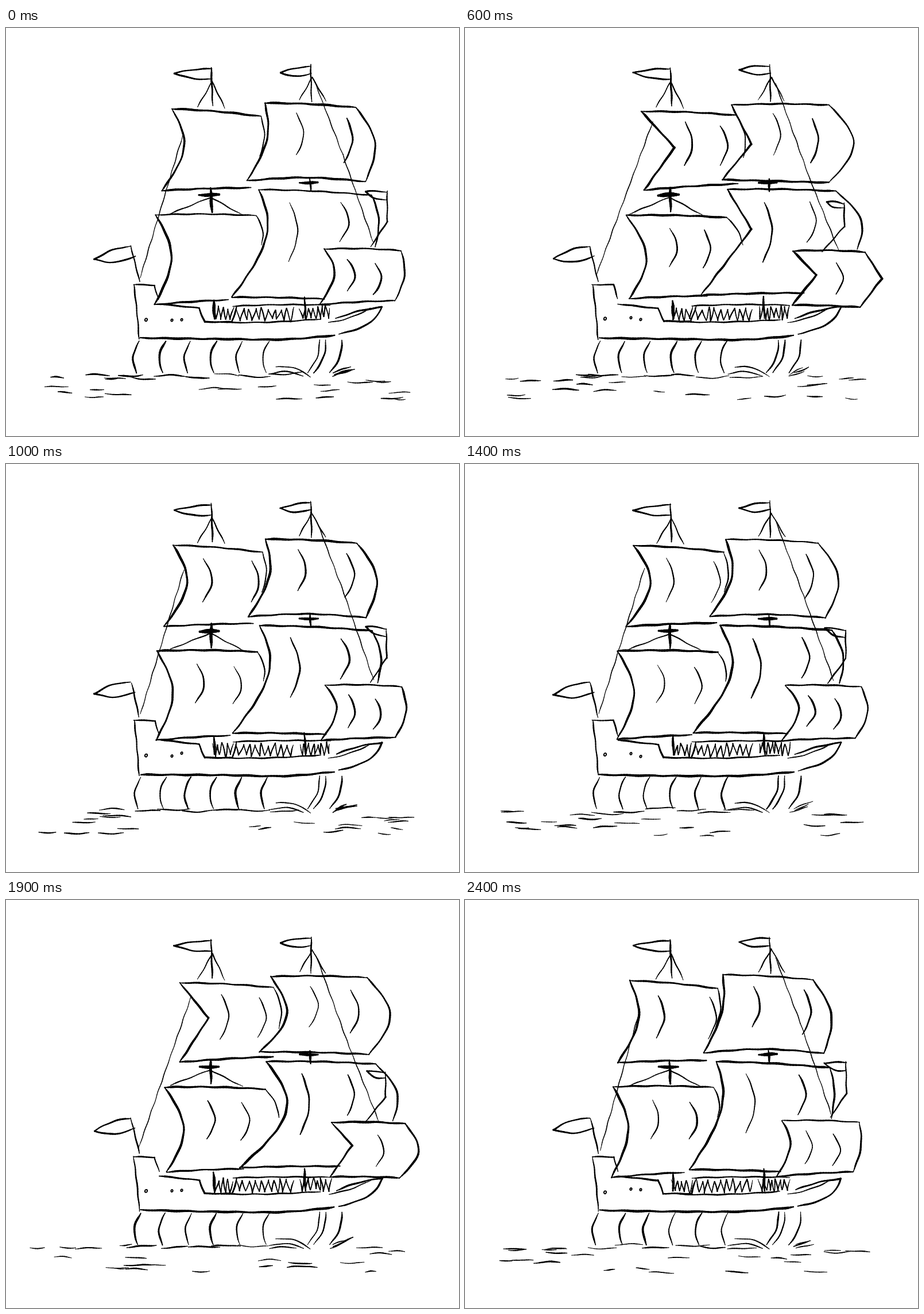
These frames come from a looping animation (789x710 px, 2.5 s). An HTML page with a canvas:

```html
<!DOCTYPE html>
<html lang="en">
<head>
<meta charset="utf-8">
<title>Sailing ship</title>
<style>
html, body { margin: 0; width: 100%; height: 100%; overflow: hidden; background: #fff; }
canvas { display: block; }
</style>
</head>
<body>
<canvas id="stage" width="789" height="710"></canvas>
<script>
const ctx = document.getElementById("stage").getContext("2d");
const STEP = 100, STEPS = 25;

// How full the sails are: [step, wind]
const gusts = [[0, 0.12], [2, 0.55], [6, 1], [10, 0.2], [14, 0.32], [19, 0.8], [24, 0]];

// Corners and edge bows, slack / full:
// luff (top, bow, bottom), leech (top, bow, end), far foot corner
const sails = {
  topLeft: "287 140 303 195 266 283 440 154 445 190 436 222 420 279 / 307 145 365 208 312 282 473 152 488 190 485 225 476 271",
  topRight: "449 130 451 172 416 266 606 139 638 200 625 267 625 267 / 464 134 499 202 448 264 634 134 677 200 634 269 634 269",
  lowLeft: "258 325 284 390 255 483 433 326 443 352 440 378 382 474 / 281 326 316 402 286 471 456 330 476 354 484 378 422 466",
  main: "438 281 449 323 391 469 636 292 643 328 638 380 550 473 / 457 281 499 350 411 465 646 284 692 345 683 385 590 461",
  jib: "552 384 566 415 543 481 687 387 690 425 676 473 676 473 / 571 388 612 430 570 482 697 390 726 436 688 486 688 486"
};

// Creases in the cloth: slack x, full x, y, half height
const folds = {
  topLeft: [[348, 396, 203, 38], [438, 457, 205, 35]],
  topRight: [[515, 550, 185, 36], [603, 616, 195, 38]],
  lowLeft: [[338, 370, 382, 33], [405, 428, 385, 32]],
  main: [[505, 535, 355, 52], [594, 611, 338, 35]],
  jib: [[606, 615, 430, 28], [653, 659, 436, 27]]
};

// Straight rigging: width, points, optionally a second state for full wind
const rigging = [
  [3, "357 69 360 136"], [2, "333 138 359 94 381 139"],
  [2.5, "531 64 532 128"], [2, "511 125 533 86 557 127"],
  [2.5, "218 380 232 441"],
  [1.5, "305 190 235 436 / 327 162 229 430"],
  [1.5, "541 100 585 215 638 372 / 540 95 600 262 651 388"],
  [2.5, "664 282 664 336 637 378 / 660 304 661 345 622 390"],
  [7, "337 291 371 290"], [5, "357 278 358 320"], [2, "286 323 356 295 412 325"],
  [6, "512 269 543 269"], [4, "529 262 531 284"],
  [2.5, "222 446 259 447 266 472"],
  [3, "266 480 336 488 346 511 394 511 402 484"],
  [5, "362 474 363 506"], [4, "520 468 522 506"]
];

const flags = [
  "358 71 327 72 293 78 324 87 359 89",
  "531 67 505 68 478 75 500 82 532 79",
  "217 380 190 383 154 400 186 406 225 397",
  "664 283 642 281 626 282 642 294 663 297 / 660 306 645 302 630 302 640 311 659 313"
];

const hull = [
  [2.5, "223 446 228 492 232 542"],
  [2.5, "375 512 450 512 548 507"], [2.5, "395 484 480 482 565 482"],
  [3, "575 505 612 493 655 485 648 499 580 533"], [2, "562 512 595 505 635 488"],
  [4, "234 540 380 542 495 542 572 535"]
];

let seed = 1;
function rand() {
  seed = (seed + 0x6D2B79F5) | 0;
  let t = Math.imul(seed ^ (seed >>> 15), 1 | seed);
  t ^= t + Math.imul(t ^ (t >>> 7), 61 | t);
  return ((t ^ (t >>> 14)) >>> 0) / 4294967296;
}
const spread = r => (rand() * 2 - 1) * r;
const range = (a, b) => a + (b - a) * rand();
const lerp = (a, b, t) => a + (b - a) * t;
const dist = (a, b) => Math.hypot(b[0] - a[0], b[1] - a[1]) || 1;
const both = f => [f(0), f(1)];

function points(text, wind) {
  const [a, b = a] = text.split("/").map(s => s.trim().split(" ").map(Number));
  const out = [];
  for (let i = 0; i < a.length; i += 2) out.push(both(k => lerp(a[i + k], b[i + k], wind)));
  return out;
}

function isCorner(a, b, c) {
  const dot = (b[0] - a[0]) * (c[0] - b[0]) + (b[1] - a[1]) * (c[1] - b[1]);
  return dot < 0.4 * dist(a, b) * dist(b, c);
}

function splitRuns(pts, straight) {
  const runs = [];
  let run = [pts[0]];
  for (let i = 1; i < pts.length; i++) {
    run.push(pts[i]);
    if (i === pts.length - 1 || straight || isCorner(pts[i - 1], pts[i], pts[i + 1])) {
      runs.push(run);
      run = [pts[i]];
    }
  }
  return runs;
}

// Unit-speed directions for a smooth curve through the points
function slopes(p) {
  const n = p.length - 1;
  const dir = i => both(k => (p[i + 1][k] - p[i][k]) / dist(p[i], p[i + 1]));
  if (n === 1) return [dir(0), dir(0)];
  const m = p.map((_, i) => {
    if (!i || i === n) return null;
    const l = dist(p[i - 1], p[i]), r = dist(p[i], p[i + 1]), d = dir(i - 1), e = dir(i);
    return both(k => (d[k] * r + e[k] * l) / (l + r));
  });
  m[0] = both(k => 1.5 * dir(0)[k] - m[1][k] / 2);
  m[n] = both(k => 1.5 * dir(n - 1)[k] - m[n - 1][k] / 2);
  return m;
}

function sample(p) {
  const m = slopes(p), out = [p[0]];
  for (let i = 0; i < p.length - 1; i++) {
    const len = dist(p[i], p[i + 1]), n = Math.max(3, Math.ceil(len / 5));
    for (let j = 1; j <= n; j++) {
      const t = j / n, u = 1 - t;
      out.push(both(k => u * u * (1 + 2 * t) * p[i][k] + t * t * (3 - 2 * t) * p[i + 1][k]
        + t * u * len * (u * m[i][k] - t * m[i + 1][k])));
    }
  }
  return out;
}

// Brush line with a slight tremble and uneven pressure
function stroke(pts, width, straight) {
  const path = splitRuns(pts, straight).flatMap(sample);
  const phase = rand() * 7, n = path.length - 1;
  const at = i => [path[i][0] + 0.45 * Math.sin(i * 0.9 + phase), path[i][1] + 0.45 * Math.cos(i * 0.7 + phase)];
  for (let i = 0; i < n; i++) {
    const taper = Math.min(1, 0.6 + Math.min(i, n - 1 - i) * 0.2);
    ctx.lineWidth = Math.max(1, width * taper * (0.95 + 0.15 * Math.sin(i * 0.35 + phase)));
    ctx.beginPath();
    ctx.moveTo(...at(i));
    ctx.lineTo(...at(i + 1));
    ctx.stroke();
  }
}

const loosen = (pts, r) => pts.map(([x, y]) => [x + spread(r), y + spread(r)]);

function edge(a, b, sag, width) {
  stroke([a, [(a[0] + b[0]) / 2, (a[1] + b[1]) / 2 + sag], b], width);
}

function drawSail(name, wind, creased) {
  const [luffTop, luffBow, luffEnd, leechTop, leechBow, leechEnd, foot] = points(sails[name], wind);
  const left = name.endsWith("Left");
  edge(luffTop, leechTop, -2, range(2.5, 4));
  edge(luffEnd, foot, name === "topRight" ? -7 + 7 * wind : -1, range(3, 4));
  stroke([luffTop, luffBow, luffEnd], range(3.2, 4.2));
  stroke([leechTop, leechBow, leechEnd], left ? 2.2 : range(2.5, 3.7));
  folds[name].forEach(([slack, full, y, h], i) => {
    if (!creased && left || name === "jib" && !i && wind > 0.7) return;
    const x = lerp(slack, full, wind), bow = 8 + h * 0.12;
    stroke(loosen([[x - bow, y - h], [x, y], [x - bow - 2, y + h]], 1.5), range(1.8, 3.2));
  });
}

function drawRibs() {
  for (let i = 0; i < 6; i++) {
    const x = 234 + 44.5 * i + spread(2);
    stroke([[x, 545], [x - 11, 573], [x - 5, 600]], range(2, 3.8));
  }
  for (const x of [546, 557, 585])
    stroke([[x, 543], [x - 3, 570], [x - 21, 600]], range(2, 3.2));
}

function zigzag(x0, x1, y0, y1, teeth) {
  const pts = [];
  for (let i = 0; i <= teeth * 2; i++)
    pts.push([lerp(x0, x1, i / teeth / 2) + spread(2), (i % 2 ? y1 : y0) + spread(3)]);
  stroke(pts, 2, true);
}

function dash(x, y, dx, dy, width) {
  stroke([[x, y], [x + dx / 2, y + dy / 2 + spread(dx * 0.05)], [x + dx, y + dy]], width);
}

function drawSea() {
  for (let i = 0; i < 10; i++) {
    dash(range(40, 210), range(601, 645), range(18, 48), spread(2), range(1.5, 3));
    dash(range(220, 690), range(616, 648), range(18, 45), spread(3), range(1.5, 2.5));
  }
  for (let x = 218; x < 480; x += 48)
    dash(x + spread(8), 604 + spread(4), range(40, 60), spread(4), range(1.5, 2.8));
  for (let i = 0; i < 3; i++) {
    dash(572 + spread(8), 606 - i * 3, range(22, 38), -range(6, 18), range(1.5, 3));
    dash(range(595, 680), range(605, 616), range(22, 45), spread(2), 2);
  }
  stroke([[470, 590], [500, 591], [530, 607]], 2);
  stroke([[458, 602], [490, 598], [518, 606]], 2);
}

function drawHoles() {
  ctx.lineWidth = 2;
  for (const [x, r] of [[244, 2.5], [289, 2], [306, 2]]) {
    ctx.beginPath();
    ctx.ellipse(x, 506 + spread(3), r * 0.8, r, 0.3, 0, Math.PI * 2);
    ctx.stroke();
  }
}

function windAt(step) {
  const i = Math.min(gusts.findLastIndex(g => g[0] <= step), gusts.length - 2);
  const [[s0, w0], [s1, w1]] = [gusts[i], gusts[i + 1]];
  return lerp(w0, w1, (step - s0) / (s1 - s0));
}

function draw(step) {
  const wind = windAt(step);
  seed = step * 7919 + 17;
  ctx.fillStyle = "#fff";
  ctx.fillRect(0, 0, 789, 710);
  ctx.strokeStyle = "#000";
  ctx.lineCap = ctx.lineJoin = "round";
  for (const [w, text] of rigging) stroke(loosen(points(text, wind), 0.8), w, true);
  for (const text of flags) {
    const flap = spread(3);
    stroke(points(text, wind).map(([x, y], i) => [x, y + flap * Math.sin(i * Math.PI / 4)]), 2.8);
  }
  for (const [w, text] of hull) stroke(loosen(points(text, wind), 0.8), w);
  for (const name in sails) drawSail(name, wind, step > 3);
  drawRibs();
  zigzag(360, 395, 487, 508, 4);
  zigzag(402, 500, 488, 508, 9);
  zigzag(512, 565, 486, 505, 7);
  drawHoles();
  drawSea();
}

let shown = -1;
function tick() {
  const step = Math.floor(performance.now() / STEP) % STEPS;
  if (step !== shown) draw(shown = step);
  requestAnimationFrame(tick);
}
tick();
</script>
</body>
</html>
```
